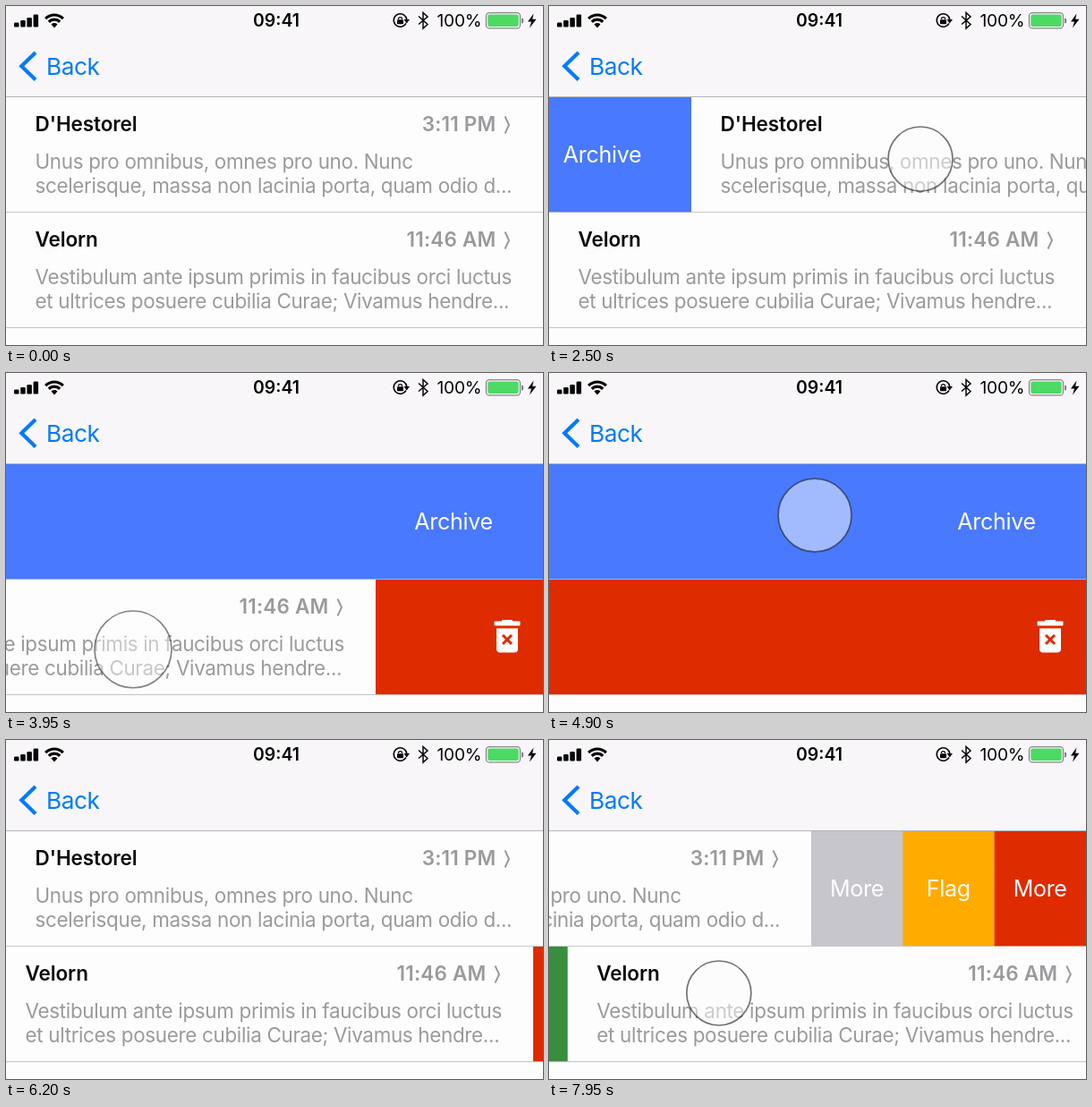
These frames come from a looping animation (600 px wide and 379 px high, 8000 ms). An HTML page with a canvas:

```html
<!DOCTYPE html>
<html lang="en">
<head>
<meta charset="utf-8">
<title>Swipe actions</title>
<style>
html, body { margin: 0; width: 100%; height: 100%; overflow: hidden; background: #fefefe; }
canvas { display: block; width: 600px; height: 379px; }
</style>
</head>
<body>
<canvas id="stage"></canvas>
<script>
const W = 600, H = 379, LOOP = 8000, STEP = 50;
const canvas = document.getElementById('stage');
const ctx = canvas.getContext('2d');
const dpr = window.devicePixelRatio || 1;
canvas.width = W * dpr;
canvas.height = H * dpr;

const FONT = 'Inter, "Open Sans", sans-serif';
const BLUE = '#4879ff', RED = '#de2b00', GREEN = '#388e3c';
const GRAY = '#c8c6cd', AMBER = '#ffab00', TINT = '#007aff';
const TEXT = '#9a9a9c', PAPER = '#fefdfe', RULE = '#c8c7cc';

const linear = p => p;
const out = p => 1 - (1 - p) ** 3;
const inOut = p => p * p * (3 - 2 * p);

// Row offsets: [time, offset, easing towards this key]
const slide1 = [
  [2150, 0], [2500, 159, inOut], [2800, 350, linear], [3200, 600, out],
  [4900, 600], [5443, 0, out],
  [6600, 0], [6950, -114, inOut], [7150, -250, linear], [7500, -307, out]
];
const slide2 = [
  [3500, 0], [3850, -187, inOut], [3950, -187], [4400, -600, inOut],
  [5800, -600], [6343, 0, out],
  [7800, 0], [8000, 33, p => p ** 1.6]
];

const rows = [
  { y: 102, slide: slide1, name: "D'Hestorel", time: '3:11 PM',
    lines: ['Unus pro omnibus, omnes pro uno. Nunc',
            'scelerisque, massa non lacinia porta, quam odio d...'] },
  { y: 231, slide: slide2, name: 'Velorn', time: '11:46 AM',
    lines: ['Vestibulum ante ipsum primis in faucibus orci luctus',
            'et ultrices posuere cubilia Curae; Vivamus hendre...'] }
];

const touches = [
  { from: 2100, to: 2850, x: 256, y: 171, slide: slide1 },
  { from: 3500, to: 3850, x: 329, y: 309, slide: slide2 },
  { from: 4750, to: 4830, x: 297, y: 159 },
  { from: 5650, to: 5730, x: 297, y: 290 },
  { from: 6500, to: 7150, x: 403, y: 184, slide: slide1 },
  { from: 7700, to: 9000, x: 169, y: 283, slide: slide2 }
];

function at(keys, t) {
  if (t <= keys[0][0]) return keys[0][1];
  for (let i = 1; i < keys.length; i++) {
    const [t0, v0] = keys[i - 1], [t1, v1, ease = linear] = keys[i];
    if (t < t1) return v0 + (v1 - v0) * ease((t - t0) / (t1 - t0));
  }
  return keys[keys.length - 1][1];
}

function box(x, y, w, h, color) {
  ctx.fillStyle = color;
  ctx.fillRect(x, y, w, h);
}

function round(x, y, w, h, r, color) {
  ctx.fillStyle = color;
  ctx.beginPath();
  ctx.roundRect(x, y, w, h, r);
  ctx.fill();
}

function line(points, width, color) {
  ctx.strokeStyle = color;
  ctx.lineWidth = width;
  ctx.beginPath();
  points.forEach(([x, y]) => ctx.lineTo(x, y));
  ctx.stroke();
}

function arc(x, y, r, a0, a1, width, color) {
  ctx.strokeStyle = color;
  ctx.lineWidth = width;
  ctx.beginPath();
  ctx.arc(x, y, r, a0, a1);
  ctx.stroke();
}

function text(str, x, y, size, color, { weight = 400, align = 'left', space = 0 } = {}) {
  ctx.font = `${weight} ${size}px ${FONT}`;
  ctx.letterSpacing = space + 'px';
  ctx.textAlign = align;
  ctx.fillStyle = color;
  ctx.fillText(str, x, y);
}

function label(str, x, y) {
  text(str, x, y + 73, 25, '#fff', { align: 'center', space: -0.3 });
}

function trash(x, y) {
  round(x - 6, y - 18, 12, 4, 1, '#fff');
  round(x - 14.5, y - 16.5, 29, 5, 1, '#fff');
  round(x - 12, y - 8.5, 24, 27, [0, 0, 4, 4], '#fff');
  line([[x - 5, y - 1], [x + 5, y + 9]], 3, RED);
  line([[x + 5, y - 1], [x - 5, y + 9]], 3, RED);
}

function actions(i, y, off) {
  if (i === 0 && off > 0) {
    box(0, y, off, 128.5, BLUE);
    label('Archive', Math.max(Math.min(off - 59.5, 59.5), off - 100), y);
  } else if (i === 0) {
    [['More', GRAY], ['Flag', AMBER], ['More', RED]].forEach(([str, color], k) => {
      const x = W + off * (3 - k) / 3;
      box(x, y, W - x, 128.5, color);
      label(str, x + 51, y);
    });
  } else if (off > 0) {
    box(0, y, off, 128.5, GREEN);
  } else {
    box(W + off, y, -off, 128.5, RED);
    trash(Math.max(W + off + 40, 560), y + 63);
  }
}

function drawRow(row, i, t) {
  const { y } = row, off = at(row.slide, t);
  box(0, y + 128, W, 1.2, RULE);
  ctx.save();
  ctx.beginPath();
  ctx.rect(0, y, W, 128.5);
  ctx.clip();
  if (off) actions(i, y, off);
  ctx.beginPath();
  ctx.rect(off, y, W, 128);
  ctx.clip();
  ctx.translate(off, 0);
  box(0, y, W, 128, PAPER);
  text(row.name, 32.5, y + 38, 22.5, '#0a0a0a', { weight: 600, space: -0.1 });
  text(row.time, 547.5, y + 38, 22.5, TEXT, { weight: 600, align: 'right', space: 0.2 });
  line([[557.5, y + 21.5], [562, y + 31], [557.5, y + 40.5]], 2, TEXT);
  row.lines.forEach((str, k) =>
    text(str, 32.5, y + 79.5 + 27.5 * k, 22.4, TEXT, { space: -0.31 }));
  ctx.restore();
}

function statusBar() {
  const ink = '#050505';
  [5, 7.5, 10.5, 14].forEach((h, i) => round(9 + 7.2 * i, 23.5 - h, 5.5, h, 1.2, ink));

  const up = -Math.PI / 2;
  [14, 8.8].forEach(r => arc(54, 24, r, up - 0.78, up + 0.78, 3.2, ink));
  ctx.fillStyle = ink;
  ctx.beginPath();
  ctx.moveTo(54, 24.5);
  ctx.arc(54, 24, 5, up - 0.78, up + 0.78);
  ctx.fill();

  text('09:41', 302, 23, 19.4, ink, { weight: 600, align: 'center' });

  arc(440.5, 16, 7.3, 0.5, Math.PI * 2 - 0.1, 1.6, ink);
  ctx.fillStyle = ink;
  ctx.beginPath();
  [[444.5, 15], [451, 15], [447.7, 19.5]].forEach(p => ctx.lineTo(...p));
  ctx.fill();
  round(437, 15.2, 7, 5, 0.8, ink);
  arc(440.5, 14.7, 2.1, Math.PI, 0, 1.3, ink);

  line([[461, 11.5], [471, 20.5], [466, 25], [466, 7.5], [471, 12], [461, 20.5]], 1.5, ink);

  text('100%', 531.5, 23, 19.2, ink, { align: 'right', space: -0.2 });

  ctx.strokeStyle = '#858587';
  ctx.lineWidth = 1.3;
  ctx.beginPath();
  ctx.roundRect(536.5, 7.7, 38, 17.2, 3.5);
  ctx.stroke();
  round(538.3, 9.6, 34.4, 13.4, 2, '#4cd964');
  round(576, 13.5, 2.2, 6, [0, 2, 2, 0], '#858587');
  ctx.fillStyle = ink;
  ctx.beginPath();
  [[589.5, 8.5], [583, 17.5], [587, 17.5], [585, 24.5], [592.5, 14.8], [588.2, 14.8]]
    .forEach(p => ctx.lineTo(...p));
  ctx.fill();
}

function header() {
  box(0, 0, W, 102, '#f8f6f9');
  box(0, 101, W, 1, '#b4b3b8');
  statusBar();
  line([[33, 52], [17.3, 67.2], [33, 82.4]], 4.2, TINT);
  text('Back', 45, 77, 26.2, TINT, { space: -0.4 });
}

function drawTouch(touch, t) {
  const { from, to, slide } = touch;
  const fade = (t - to) / 200;
  if (t < from || fade >= 1) return;
  const gone = Math.max(fade, 0);
  ctx.globalAlpha = Math.min((t - from + 50) / 100, 1) * (1 - gone ** 3);
  const x = touch.x + (slide ? at(slide, Math.min(t, to)) : 0);
  const r = 36 + 14 * gone;
  ctx.fillStyle = 'rgba(252, 252, 252, 0.52)';
  ctx.beginPath();
  ctx.arc(x, touch.y, r, 0, Math.PI * 2);
  ctx.fill();
  ctx.strokeStyle = 'rgba(30, 30, 30, 0.62)';
  ctx.lineWidth = 1.7;
  ctx.stroke();
  ctx.globalAlpha = 1;
}

function frame(now) {
  const t = Math.floor((now % LOOP) / STEP) * STEP;
  ctx.setTransform(dpr, 0, 0, dpr, 0, 0);
  box(0, 0, W, H, PAPER);
  header();
  rows.forEach((row, i) => drawRow(row, i, t));
  touches.forEach(touch => drawTouch(touch, t));
}

function loop() {
  frame(performance.now());
  requestAnimationFrame(loop);
}
loop();
</script>
</body>
</html>
```
